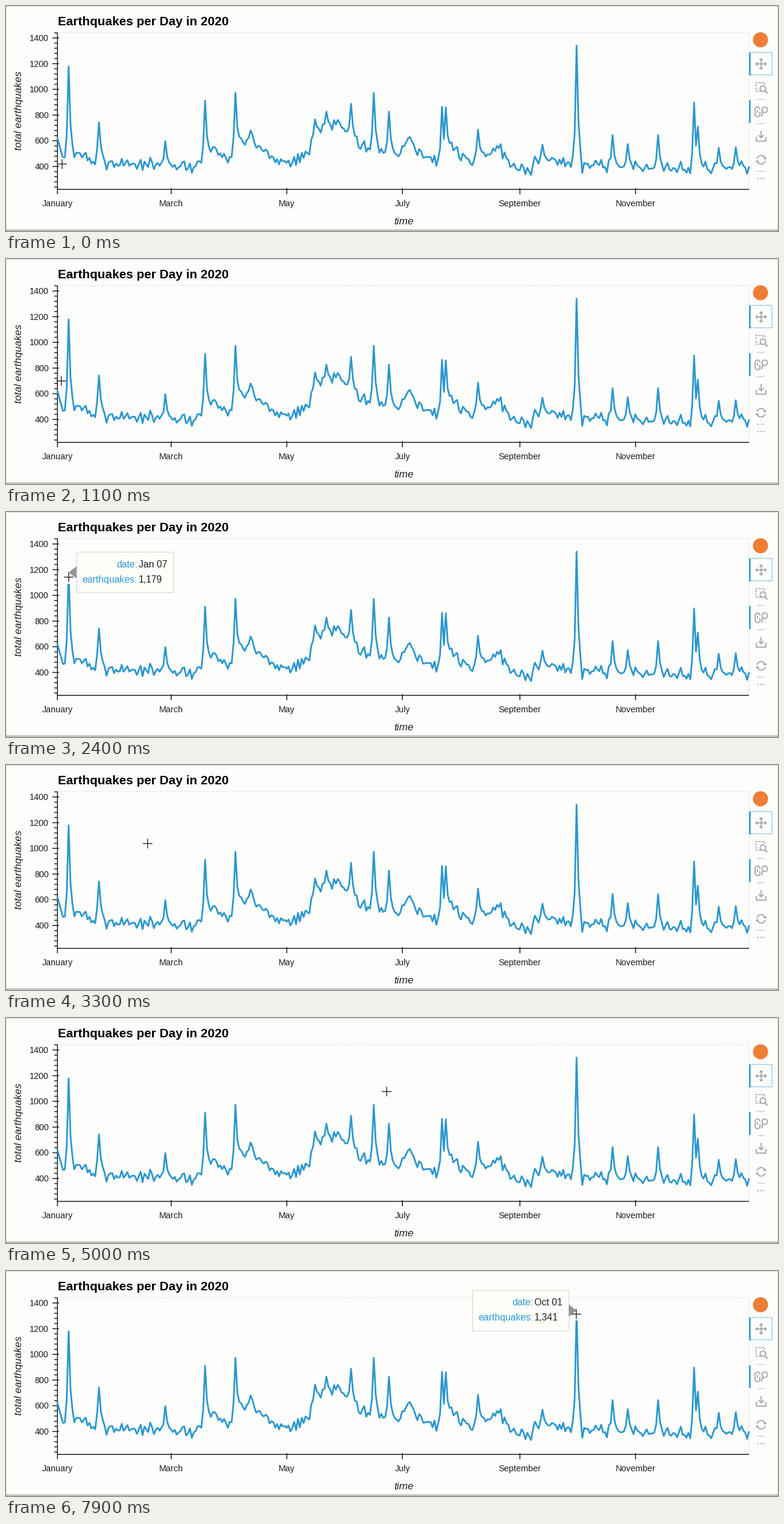
Animation, 1280 px wide and 373 px high, one loop 8000 ms. Source, as a matplotlib script:

```python
import numpy as np
import matplotlib.pyplot as plt
from matplotlib.animation import FuncAnimation
from matplotlib.patches import Circle, Polygon, Rectangle

W, H, DPI = 1280, 373, 100
FRAMES, INTERVAL = 80, 100
PT = 72 / DPI

PAPER, INK, GREY = "#fdfdfb", "#1e1e1e", "#a1a6a9"
BLUE, ACCENT = "#2b97cf", "#2b9bd6"
LEFT, RIGHT, TOP, BOTTOM = 85, 1232, 44, 304

plt.rcParams["font.family"] = "Liberation Sans"
fig = plt.figure(figsize=(W / DPI, H / DPI), dpi=DPI, facecolor=PAPER)
ax = fig.add_axes([0, 0, 1, 1])
ax.set_xlim(0, W)
ax.set_ylim(H, 0)
ax.axis("off")


def day_x(day):
    return LEFT + day * (RIGHT - LEFT) / 365


def count_y(count):
    return 266 - (count - 400) * 0.213


def line(xs, ys, color=INK, width=1.5, z=2, **kw):
    kw.setdefault("solid_capstyle", "butt")
    return ax.plot(xs, ys, color=color, lw=width * PT, zorder=z,
                   snap=False, **kw)[0]


def text(x, y, s, size, color=INK, z=3, **kw):
    kw.setdefault("va", "baseline")
    return ax.text(x, y, s, fontsize=size * PT, color=color, zorder=z, **kw)


def arc(cx, cy, r, start=0, stop=360, width=1.8):
    a = np.radians(np.linspace(start, stop, 40))
    line(cx + r * np.cos(a), cy + r * np.sin(a), GREY, width)


# Slow level of the series, as (day, count)
LEVEL = [
    (0, 625), (3, 466), (12, 500), (26, 445), (42, 415), (74, 405), (83, 555),
    (90, 430), (98, 635), (118, 430), (132, 500), (137, 680), (149, 740),
    (159, 570), (180, 490), (185, 615), (194, 455), (202, 435), (208, 565),
    (218, 445), (232, 550), (243, 370), (254, 455), (290, 405), (330, 380),
    (365, 390),
]

# Sudden shocks, as (day, peak count)
SHOCKS = [
    (6, 1179), (22, 743), (57, 597), (78, 912), (94, 973), (102, 680),
    (136, 766), (142, 827), (155, 888), (167, 973), (175, 827), (203, 865),
    (205, 860), (222, 686), (256, 569), (274, 1341), (293, 644), (301, 574),
    (317, 644), (336, 898), (338, 710), (349, 545), (358, 550),
]


def daily_counts():
    """Noisy level; each shock rises in a day and fades as aftershocks."""
    days = np.arange(366)
    level = np.interp(days, *zip(*LEVEL))
    noise = np.random.default_rng(7).normal(0, 28, days.size)
    noise[:5] = 0
    counts = level + noise
    for day, peak in SHOCKS:
        since = days - day
        shape = np.where(since < 0, 0.25 * (since == -1),
                         0.35 ** np.maximum(since, 0))
        shock = level + (peak - level) * shape
        counts = np.where(shape > 0.05, np.maximum(counts, shock), counts)
    return days, counts


DAYS, COUNTS = daily_counts()


def draw_frame():
    line([0, W], [0.5, 0.5], "#d6d6d0", 1)
    line([0.5, 0.5], [0, H], "#dededa", 1)
    line([W - 0.5] * 2, [0, H], "#dededa", 1)
    line([0, W], [371.5, 371.5], "#85857a", 1.2)


def draw_chart():
    text(85.5, 32, "Earthquakes per Day in 2020", 20.8, "black",
         weight="bold")
    text(659.5, 362, "time", 17.2, style="italic", ha="center")
    text(21.3, 173.5, "total earthquakes", 17.1, style="italic", rotation=90,
         ha="center", va="center")

    line([LEFT, RIGHT, RIGHT], [TOP, TOP, BOTTOM], "#d9d9d9", 1, z=1,
         ls=(0, (1.5, 1)))
    line([LEFT + 0.3] * 2, [TOP, BOTTOM])
    line([LEFT, RIGHT], [BOTTOM, BOTTOM])

    for count in range(240, 1441, 40):
        y = count_y(count)
        major = count % 200 == 0 and count >= 400
        line([77 if major else 80, 88 if major else 85], [y, y])
        if major:
            text(71, y + 5, str(count), 14.4, ha="right")

    months = [(0, "January"), (60, "March"), (121, "May"), (182, "July"),
              (244, "September"), (305, "November")]
    for day, name in months:
        x = day_x(day) + 0.3
        line([x, x], [302, 312])
        text(x, 332, name, 14.4, ha="center")

    line(day_x(DAYS), count_y(COUNTS), BLUE, 2.8, z=4,
         solid_joinstyle="round")


def arrow_head(x, y, dx, dy, size=3.8):
    tip = (x + dx * size, y + dy * size)
    ax.add_patch(Polygon([tip, (x - dy * size, y + dx * size),
                          (x + dy * size, y - dx * size)],
                         fc=GREY, ec="none", zorder=3))


def draw_toolbar():
    ax.add_patch(Circle((1251, 56), 12.5, fc="#ee7d35", ec="none"))
    line([1234, 1270, 1270, 1234], [77, 77, 114, 114], ACCENT, 1.3,
         ls=(0, (1.2, 1.2)))
    for y in (77, 156):
        line([1233.3] * 2, [y, y + 38], ACCENT, 2.6)
    for y in (155, 195, 274):
        line([1245, 1258], [y, y], "#c6c9cb", 1.3)

    # pan
    line([1245, 1259], [96, 96], GREY, 1.8)
    line([1252, 1252], [89, 103], GREY, 1.8)
    for dx, dy in ((1, 0), (-1, 0), (0, 1), (0, -1)):
        arrow_head(1252 + 6 * dx, 96 + 6 * dy, dx, dy)

    # box zoom
    line([1252, 1243.5, 1243.5, 1258, 1258], [141, 141, 127, 127, 130],
         GREY, 1.7, ls=(0, (2, 1.2)))
    arc(1255, 137, 4.6)
    line([1258.2, 1262.5], [140.5, 145], GREY, 2.2)

    # wheel zoom
    a = np.linspace(0, 2 * np.pi, 60)
    line(1246 + 4 * np.cos(a), 175.5 + 4 * np.sin(a)
         + 4 * np.sign(np.sin(a)), GREY, 1.8)
    line([1246, 1246], [172, 177], GREY, 1.8)
    arc(1258, 172, 4.6)
    line([1255, 1252.5], [175.5, 183], GREY, 2)

    # save
    line([1252, 1252], [207, 218], GREY, 1.8)
    line([1247.5, 1252, 1256.5], [214, 218.5, 214], GREY, 1.8)
    line([1244, 1244, 1260, 1260], [217, 224, 224, 217], GREY, 1.8)

    # reset
    for side in (1, -1):
        turn = 0 if side > 0 else 180
        arc(1252, 255, 7, 195 + turn, 335 + turn)
        arrow_head(1252 + 6.5 * side, 255 - 3.5 * side, 0, side, 3.4)

    for x in (1247, 1252, 1257):
        ax.add_patch(Circle((x, 286), 1.1, fc=GREY, ec="none"))


def make_tooltip(day, date, side):
    """Box beside a data point; side is 1 for right and -1 for left."""
    x, y = day_x(day), count_y(COUNTS[day])
    base = x + 13 * side
    left = base if side > 0 else base - 160
    top = y - 34
    box = Rectangle((left, top), 160, 67, fc=(1, 1, 0.99, 0.93),
                    ec="#d8d8d2", lw=1.2 * PT, zorder=6)
    arrow = Polygon([(x, y), (base, y - 10), (base, y + 10)],
                    fc="#909599", ec="none", zorder=7)
    parts = [ax.add_patch(box), ax.add_patch(arrow)]
    rows = (("date:", date), ("earthquakes:", f"{COUNTS[day]:,.0f}"))
    for i, (label, value) in enumerate(rows):
        baseline = top + 25.5 + 25 * i
        parts.append(text(left + 101, baseline, label, 15.7, ACCENT, 8,
                          ha="right"))
        parts.append(text(left + 103, baseline, value, 15.7, "#1c1c1c", 8))
    return parts


draw_frame()
draw_chart()
draw_toolbar()

# Visible span in ms, and the tooltip shown then
TOOLTIPS = [
    (300, 1000, make_tooltip(3, "Jan 04", 1)),
    (1700, 2800, make_tooltip(6, "Jan 07", 1)),
    (6500, 8000, make_tooltip(274, "Oct 01", -1)),
]

# Pointer path: ms, x, y
PATH = np.array([
    (0, 93, 262), (300, 91, 251), (900, 91, 251), (1500, 93, 104.5),
    (1800, 104, 108), (2700, 104, 108), (3900, 365.5, 152.5),
    (6200, 921, 88.5), (6500, 945.5, 71.5),
])

halo = ax.add_patch(Rectangle((0, 0), 8, 21, fc=PAPER, ec="none", zorder=5))
bar_h = line([], [], "#1a1a1a", 1.3, z=10)
bar_v = line([], [], "#1a1a1a", 1.3, z=10)


def update(frame):
    t = frame * INTERVAL
    x, y = (np.interp(t, PATH[:, 0], PATH[:, i]) for i in (1, 2))
    bar_h.set_data([x - 8, x + 8], [y, y])
    bar_v.set_data([x, x], [y - 8, y + 8])
    halo.set_xy((x - 4, y - 10.5))
    for start, stop, parts in TOOLTIPS:
        for part in parts:
            part.set_visible(start <= t < stop)
    return [bar_h, bar_v, halo]


anim = FuncAnimation(fig, update, frames=FRAMES, interval=INTERVAL,
                     init_func=lambda: update(0), repeat=True,
                     repeat_delay=0, blit=False)
plt.show()
```
